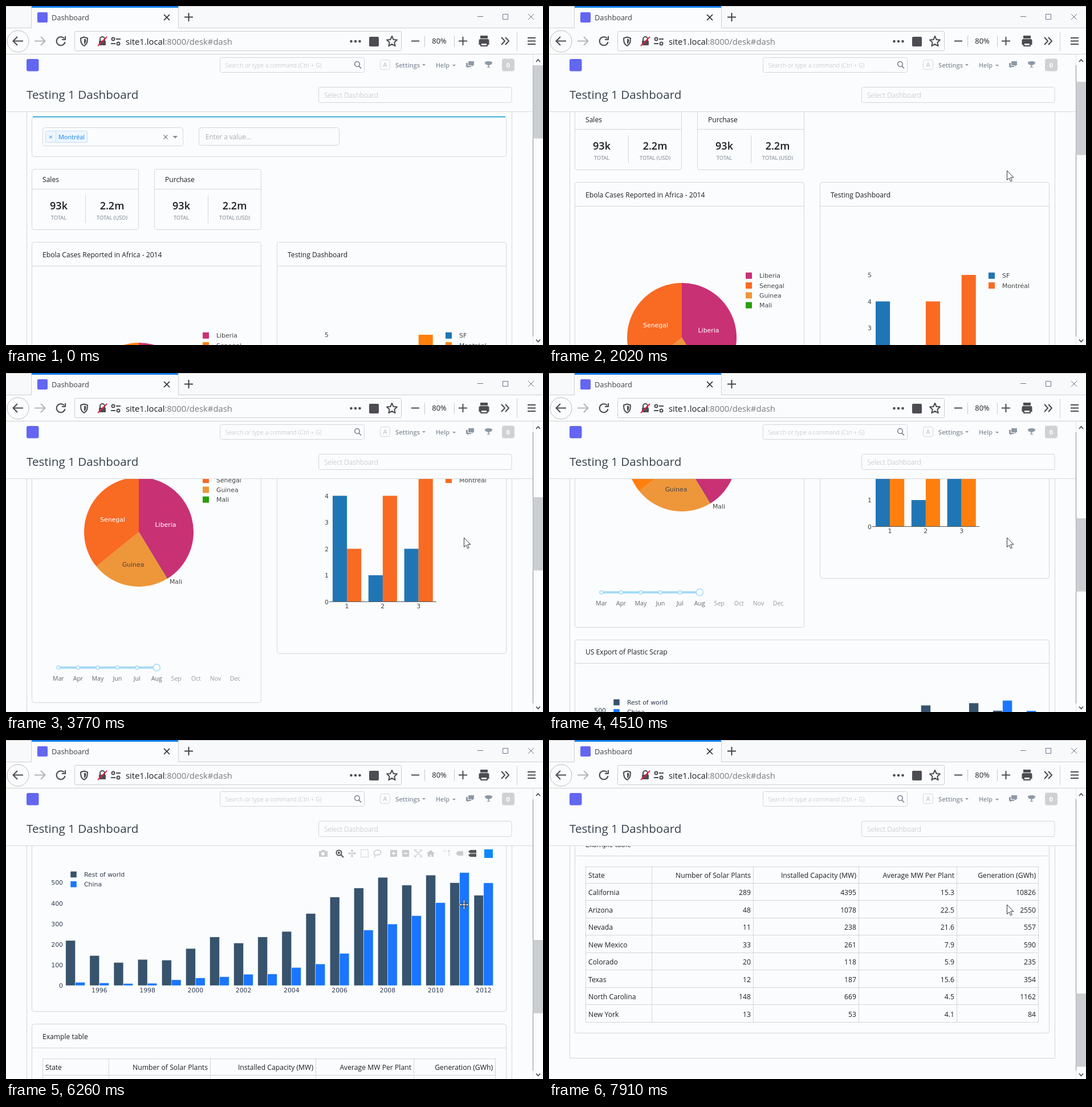
Recreate the animation shown at these times as an HTML page. Size 942 px wide and 595 px high, loop 8 s.

```html
<!DOCTYPE html>
<html lang="en">
<head>
<meta charset="utf-8">
<title>Dashboard</title>
<style>
  html, body { margin: 0; width: 100%; height: 100%; overflow: hidden; background: #fbfcfd; }
  svg { display: block; width: 942px; height: 595px; --orange: #ff7f0e; }
  text { font-family: "Open Sans", "Noto Sans", sans-serif; fill: #1b1e22; }
  .plot text { font-family: "DejaVu Sans", sans-serif; font-size: 10.9px; fill: #444; }
  .edged rect { stroke: #fbfcfd; stroke-width: .5; }
  .edged text { fill: #2f3b52; }
  .box { fill: none; stroke: #d2d6da; }
  .icon { fill: none; stroke: #4c4c52; stroke-width: 2; stroke-linejoin: round; }
  .pale { fill: none; stroke: #c9cbce; stroke-width: 1.4; }
  .solid { fill: #c9cbce; }
</style>
</head>
<body>
<svg viewBox="0 0 942 595">
  <defs>
    <g id="modebar">
      <path class="solid" fill-rule="evenodd" d="M549 484h4l1-2h5l1 2h4v10h-15zM556 485.500a3.200 3.200 0 1 0 .01 0z"/>
      <g fill="none" stroke="#555" stroke-width="2">
        <circle cx="584" cy="487" r="4.500"/><path d="M587 490l5 5M582 487h4M584 485v4"/>
      </g>
      <path class="pale" d="M601 488h12M607 482v12M603 486l-2 2 2 2M611 486l2 2-2 2M605 484l2-2 2 2M605 492l2 2 2-2"/>
      <rect class="pale" x="622.500" y="481.500" width="13" height="13" stroke-dasharray="2 1.500"/>
      <path class="pale" d="M647 491c-4-3-1-9 5-9s7 6 3 8-7 0-8 1-1 3 1 4"/>
      <path class="solid" d="M674 482h12v12h-12zM695 482h12v12h-12z"/>
      <path stroke="#fff" stroke-width="2" d="M677 488h6M680 485v6M698 488h6"/>
      <path class="pale" d="M719 484l8 8M727 484l-8 8M717 485v-3h3M726 482h3v3M717 491v3h3M726 494h3v-3"/>
      <path class="solid" d="M738 488l7-6 7 6-1 1-1-1v6h-4v-4h-2v4h-4v-6l-1 1z"/>
      <path class="pale" d="M767 484h7M777 487v7" stroke-dasharray="2 1.500"/>
      <circle class="solid" cx="777" cy="484" r="1.700"/>
      <path class="solid" d="M789 488l4-4h9v8h-9z"/>
      <path fill="#555" d="M811 485l3-3h11v5.500h-11zM811 491l3-2.500h11v5.500h-11z"/>
      <rect x="839" y="481" width="15" height="15" fill="#0d88fb"/>
    </g>
  </defs>

  <rect width="942" height="595" fill="#fbfcfd"/>
  <g id="page"></g>

  <g id="header">
    <rect y="38" width="942" height="147" fill="#fbfcfd"/>
    <path d="M0 185.500H925" stroke="#d5d8dc"/>
    <rect x="36" y="93" width="21.500" height="21.500" rx="3" fill="#6366f1"/>
    <rect class="box" x="375.500" y="90.500" width="253" height="26" rx="3"/>
    <g fill="none" stroke="#58677a" stroke-width="1.300"><circle cx="616" cy="102" r="4.300"/><path d="M619 105.500l4 4"/></g>
    <rect class="box" x="656.500" y="94.500" width="17" height="17" rx="3"/>
    <path d="M730 102h6l-3 3zM783 103h6l-3 3z" fill="#8d99a6"/>
    <path d="M811 97h10v7h-2v2l-3-2h-5zM807 100h3v5h6v2h-4l-3 2v-2h-2z" fill="#8d99a6"/>
    <path d="M843 97h7v1h3c0 3-1 5-4 5l-2 2v1l3 2h-7l3-2v-1l-2-2c-3 0-4-2-4-5h3z" fill="#8d99a6"/>
    <rect x="870" y="92.500" width="22" height="22" rx="4" fill="#cfd2d5"/>
    <rect class="box" x="548.500" y="142.500" width="338.500" height="27" rx="3"/>
  </g>

  <g id="browser">
    <rect width="942" height="38" fill="#f8f9fb"/>
    <path d="M0 .5H942" stroke="#c4c6c9"/>
    <rect x="45" y="1" width="257" height="38" fill="#fbfcfd"/>
    <path d="M0 38.500H44.500V1M302.500 1V38.500H942M0 84.500H942M896.500 45V79" fill="none" stroke="#cdcfd2"/>
    <rect x="45" width="257" height="3" fill="#0a7be8"/>
    <rect x="55" y="11" width="18" height="18" rx="2" fill="#6366f1"/>
    <path d="M277 15l10 10M287 15l-10 10" stroke="#222" stroke-width="1.600"/>
    <path d="M313 19.500h15M320.500 12v15" stroke="#444" stroke-width="2"/>
    <path d="M827 18.500h10M871.500 14.500h9v9h-9zM916 14l10 10M926 14l-10 10" fill="none" stroke="#68768c"/>
    <circle cx="21" cy="62" r="19" fill="none" stroke="#b9bbbe"/>
    <path class="icon" d="M30 61.500H13M20 54l-7.500 7.500 7.500 7.500"/>
    <path class="icon" style="stroke:#b3b5b8" d="M50 61.500H68M61 54l7.500 7.500-7.500 7.500"/>
    <path class="icon" d="M102 57a7.500 7.500 0 1 0 1.500 6M104 53v6h-6"/>
    <rect x="120.500" y="44.500" width="573" height="34" rx="2" fill="none" stroke="#cccdd0"/>
    <path class="icon" d="M137 54.500l6 2c0 7-1 10.500-6 13.500-5-3-6-6.500-6-13.500z"/>
    <path fill="#4c4c52" d="M137 57.500l3.500 1c0 4.500-.5 6.500-3.500 8.500z"/>
    <rect x="163" y="61" width="12" height="8" rx="1" fill="#4c4c52"/>
    <path class="icon" d="M165 61v-3a4 4 0 0 1 8 0v3"/>
    <path d="M161 70L177 54" stroke="#e2213f" stroke-width="2"/>
    <path class="icon" d="M193 58h8M184 66h8"/>
    <circle class="icon" cx="188" cy="58" r="2.500"/><circle class="icon" cx="197" cy="66" r="2.500"/>
    <path d="M605.500 62h.01M613 62h.01M620.500 62h.01" stroke="#4c4c52" stroke-width="4.500" stroke-linecap="round"/>
    <rect x="637" y="54" width="17" height="17" rx="2" fill="#4c4c52"/>
    <path class="icon" d="M677 53l2.700 6 6.300.6-4.700 4.300 1.400 6.300-5.700-3.300-5.700 3.300 1.400-6.300-4.700-4.300 6.300-.6z"/>
    <path class="icon" d="M711 61.500h14M794 61.500h15M801.500 54v15"/>
    <path d="M734.500 52V72M786.500 52V72" stroke="#c6c8cb"/>
    <path fill="#4c4c52" d="M832 52h13v5h-13zM831 58h15l1.500 2v8h-3v-3h-12v3h-3v-8z"/>
    <path class="icon" d="M833 65h11v5h-11z" style="fill:#fbfcfd"/>
    <path class="icon" d="M869 55l6 6.500-6 6.500M876 55l6 6.500-6 6.500M915 56h14M915 61.500h14M915 67h14"/>
  </g>

  <rect x="925" y="85" width="17" height="510" fill="#fbfcfd"/>
  <path d="M924.500 85V595" stroke="#e2e4e6"/>
  <path d="M924.500 104V580" stroke="#8b8d90"/>
  <rect id="thumb" x="924.500" y="104" width="17.500" height="128.500" fill="#cbced1"/>
  <path d="M930 98l3.500-4 3.500 4M930 585.500l3.500 4 3.500-4" fill="none" stroke="#4a4d52" stroke-width="1.800"/>

  <g id="cursor">
    <path id="arrow" d="M0 0V16.500L3.700 13 6.300 18.800 8.800 17.700 6.200 12H11.500Z" fill="#fff" stroke="#333"/>
    <path id="move" d="M0-8l3 3H1v4h4v-2l3 3-3 3V1H1v4h2l-3 3-3-3h2V1h-4v2l-3-3 3-3v2h4v-4h-2z" fill="#fff" stroke="#222" stroke-width=".9"/>
  </g>
</svg>

<script>
const $ = id => document.getElementById(id);
const svg = document.querySelector('svg');

// y is the middle of the capitals
const text = (x, y, str, size = 12, attrs = '') =>
  `<text x="${x}" y="${y + size * .36}" font-size="${size}" ${attrs}>${str}</text>`;
const label = (x, y, str, anchor = 'middle', color = '') =>
  `<text x="${x}" y="${y + 3.9}" text-anchor="${anchor}" style="fill:${color}">${str}</text>`;
const rect = (x, y, w, h, fill) => `<rect x="${x}" y="${y}" width="${w}" height="${h}" fill="${fill}"/>`;
const box = (x, y, x2, y2, r = 4) =>
  `<rect class="box" x="${x}" y="${y}" width="${x2 - x}" height="${y2 - y}" rx="${r}"/>`;
const line = d => `<path class="box" d="${d}"/>`;
const card = (x, y, x2, y2, head, title) =>
  box(x, y, x2, y2) + line(`M${x} ${head}H${x2}`) + text(x + 18.5, (y + head) / 2 + 1, title, 12.1);
const legend = (x, y, gap, items) => items.map(([name, color], i) =>
  rect(x, y + i * 17.3 - 5.5, 11, 11, color) + label(x + gap, y + i * 17.3, name, 'start')).join('');

function filters() {
  return box(45.5, 194.5, 877.5, 264.5)
    + '<path d="M47 194.500H876" stroke="#36aed0" stroke-width="1.800"/>'
    + box(64.5, 213.5, 310.5, 245.5) + box(338.5, 213.5, 584.5, 244.5)
    + '<rect x="69.500" y="219.500" width="73" height="20" rx="2" fill="#eef6ff" stroke="#bfdffb"/>'
    + '<path d="M87.500 220V239" stroke="#bfdffb"/>'
    + '<path d="M76 227.500l5 5M81 227.500l-5 5" stroke="#1482ee"/>'
    + '<path d="M276.500 226.500l7 7M283.500 226.500l-7 7" stroke="#888" stroke-width="1.300"/>'
    + '<path d="M292.500 228h8.500l-4.200 4.500z" fill="#888"/>'
    + text(92, 230, 'Montréal', 10.9, 'style="fill:#1482ee"')
    + text(350, 230, 'Enter a value...', 11.7, 'style="fill:#a9adb2"');
}

function totals(x, title) {
  const mid = 'text-anchor="middle"', small = mid + ' style="fill:#74808b"';
  return card(x, 286.5, x + 187, 392.5, 321.5, title) + line(`M${x + 94} 332V381`)
    + text(x + 47, 350.5, '93k', 18, mid + ' font-weight="600"')
    + text(x + 140.5, 350.5, '2.2m', 18, mid + ' font-weight="600"')
    + text(x + 47, 371.5, 'TOTAL', 9.4, small) + text(x + 140.5, 371.5, 'TOTAL (USD)', 9.4, small);
}

function pie() {
  const cx = 233, cy = 687, r = 96;
  const at = deg => {
    const a = deg * Math.PI / 180;
    return `${cx + r * Math.sin(a)} ${cy - r * Math.cos(a)}`;
  };
  const slice = (from, to, color) =>
    `<path style="fill:${color}" d="M${cx} ${cy}L${at(from)}A${r} ${r} 0 0 1 ${at(to)}Z"/>`;
  const pink = '#c93175', amber = '#ee963a', green = '#2a9d0b';
  return '<g class="plot">' + slice(0, 148.6, pink) + slice(148.5, 148.8, green)
    + slice(148.8, 230.9, amber) + slice(230.9, 360, 'var(--orange)')
    + label(187, 665.5, 'Senegal', 'middle', '#fff') + label(280, 674, 'Liberia', 'middle', '#fff')
    + label(223, 744, 'Guinea') + label(298, 774.5, 'Mali')
    + legend(345, 578.3, 24, [['Liberia', pink], ['Senegal', 'var(--orange)'], ['Guinea', amber], ['Mali', green]])
    + '</g>';
}

function slider() {
  const x = i => 92 + i * 34.45, y = 925, blue = '#a5dbf8';
  let out = rect(92, y - 2, 172, 4, blue);
  'Mar Apr May Jun Jul Aug Sep Oct Nov Dec'.split(' ').forEach((month, i) => {
    if (i < 6) out += `<circle cx="${x(i)}" cy="${y}" r="${i < 5 ? 3 : 6}" fill="#fff" stroke="${blue}" stroke-width="1.600"/>`;
    out += text(x(i), 944.5, month, 10.6, `text-anchor="middle" style="fill:${i < 6 ? '#666' : '#999'}"`);
  });
  return out;
}

// two bars per group, values counted up from the base line
function bars(x, base, pitch, w, unit, first, second, colors) {
  return [first, second].map((row, k) => row.map((v, i) =>
    rect(x + i * pitch + k * w, base - v * unit, w, v * unit, colors[k])).join('')).join('');
}

function cityChart() {
  const colors = ['#2076b4', 'var(--orange)'], base = 809.5;
  let out = '<g class="plot">' + bars(573, base, 62.8, 25.1, 46.5, [4, 1, 2], [2, 4, 5], colors)
    + `<path d="M567 ${base}H755" stroke="#555"/>`
    + legend(771, 578.3, 24, [['SF', colors[0]], ['Montréal', colors[1]]]);
  for (let v = 0; v < 6; v++) out += label(566, base + .5 - v * 46.5, v, 'end');
  for (let i = 0; i < 3; i++) out += label(598 + i * 62.8, 817.5, i + 1);
  return out + '</g>';
}

function exportChart() {
  const colors = ['#37536d', '#1a76ff'], base = 1313;
  const world = [219, 146, 112, 127, 124, 180, 236, 207, 236, 263, 350, 430, 474, 526, 488, 537, 500, 439];
  const china = [16, 13, 10, 11, 28, 37, 43, 55, 56, 88, 105, 156, 270, 299, 340, 403, 549, 499];
  let out = '<g class="plot edged">' + bars(104.8, base, 42.13, 16.85, .361, world, china, colors)
    + legend(113, 1118, 24, [['Rest of world', colors[0]], ['China', colors[1]]]);
  for (let v = 0; v < 6; v++) out += label(100, base - v * 36.1, v * 100, 'end');
  for (let i = 1; i < 18; i += 2) out += label(121.7 + i * 42.13, 1321, 1995 + i);
  return out + '</g>';
}

function table() {
  const rows = `State,Number of Solar Plants,Installed Capacity (MW),Average MW Per Plant,Generation (GWh)
California,289,4395,15.3,10826
Arizona,48,1078,22.5,2550
Nevada,11,238,21.6,557
New Mexico,33,261,7.9,590
Colorado,20,118,5.9,235
Texas,12,187,15.6,354
North Carolina,148,669,4.5,1162
New York,13,53,4.1,84`.split('\n');
  const edges = [180.5, 358.5, 543.5, 715.5, 858.5], top = 1441.5, end = 1714.5;
  let out = box(64.5, top, 858.5, end, 0);
  edges.slice(0, 4).forEach(x => out += line(`M${x} ${top}V${end}`));
  rows.forEach((row, i) => {
    const y = 1456.5 + i * 30.5;
    if (i) out += line(`M64.5 ${Math.floor(1470 + (i - 1) * 30.5) + .5}H858.5`);
    row.split(',').forEach((cell, c) => out += c
      ? text(edges[c] - 4.5, y, cell, 12.2, 'text-anchor="end"') : text(69, y, cell, 12.2));
  });
  return out;
}

$('page').innerHTML = line('M36.500 180V1777.500H887.500V180') + filters()
  + totals(45.5, 'Sales') + totals(260.5, 'Purchase')
  + card(45.5, 414.5, 447.5, 986.5, 456.5, 'Ebola Cases Reported in Africa - 2014') + pie() + slider()
  + card(475.5, 414.5, 877.5, 900.5, 456.5, 'Testing Dashboard') + cityChart()
  + card(45.5, 1008.5, 877.5, 1358.5, 1049.5, 'US Export of Plastic Scrap') + exportChart()
  + card(45.5, 1380.5, 877.5, 1733.5, 1422.5, 'Example table') + table()
  + '<use id="tools1" href="#modebar"/><use id="tools2" href="#modebar" y="593"/>';

$('header').insertAdjacentHTML('beforeend',
  text(384.5, 104, 'Search or type a command (Ctrl + G)', 10.4, 'font-weight="300" style="fill:#b4b9be"')
  + text(665, 103.5, 'A', 11, 'text-anchor="middle" style="fill:#b9bec4"')
  + text(683, 104, 'Settings', 11.2, 'font-weight="600" style="fill:#85919d"')
  + text(754, 104, 'Help', 10.8, 'font-weight="600" style="fill:#85919d"')
  + text(881, 104, '0', 11, 'text-anchor="middle" font-weight="700" style="fill:#fff"')
  + text(36, 155.5, 'Testing 1 Dashboard', 20.6, 'style="fill:#36414c"')
  + text(558, 156.5, 'Select Dashboard', 12, 'font-weight="300" style="fill:#b4b9be"'));

$('browser').insertAdjacentHTML('beforeend',
  text(80, 20.5, 'Dashboard', 12.8, 'style="fill:#3c3f44"')
  + text(210, 62.5, 'site1.local<tspan fill="#777a80">:8000/desk#dash</tspan>', 14.8)
  + text(760, 61.5, '80%', 13, 'text-anchor="middle"'));

// keys are [tick, value]
function track(keys, n) {
  const i = keys.findIndex(k => k[0] >= n);
  if (i < 0) return keys[keys.length - 1][1];
  if (!i) return keys[0][1];
  const [a, from] = keys[i - 1], [b, to] = keys[i];
  return from + (to - from) * (n - a) / (b - a);
}

const scrollKeys = [[7, 0], [9, 22], [13, 105], [21, 276], [33, 540], [40, 746], [41, 746], [42, 771],
  [49, 966], [50, 966], [52, 1022], [54, 1090], [57, 1090], [60, 1219]];
const cursorX = [[0, 842], [3, 810], [5, 808], [7, 803.5]];
const cursorY = [[0, 570], [1, 505], [2, 430], [3, 348], [5, 348], [6, 315], [7, 289]];
const show = (id, on) => $(id).setAttribute('visibility', on ? 'visible' : 'hidden');

function draw(t) {
  const n = Math.floor((t - 370) / 125.4);
  const s = Math.round(track(scrollKeys, n));
  $('page').setAttribute('transform', `translate(0 ${-s})`);
  $('thumb').setAttribute('y', Math.round(104 + s * .2797));
  $('cursor').setAttribute('transform', `translate(${track(cursorX, n)} ${track(cursorY, n)})`);
  const dragging = s > 821 && s < 1024;
  show('arrow', n >= 0 && !dragging);
  show('move', dragging);
  show('tools1', (n >= 0 && n < 6) || (s > 170 && s < 600));
  show('tools2', s > 775 && s < 1065);
  svg.style.setProperty('--orange', n > 10 && n < 29 ? '#f96a23' : '#ff7f0e');
}

const start = performance.now();
(function frame() {
  draw((performance.now() - start) % 8000);
  requestAnimationFrame(frame);
})();
</script>
</body>
</html>
```
